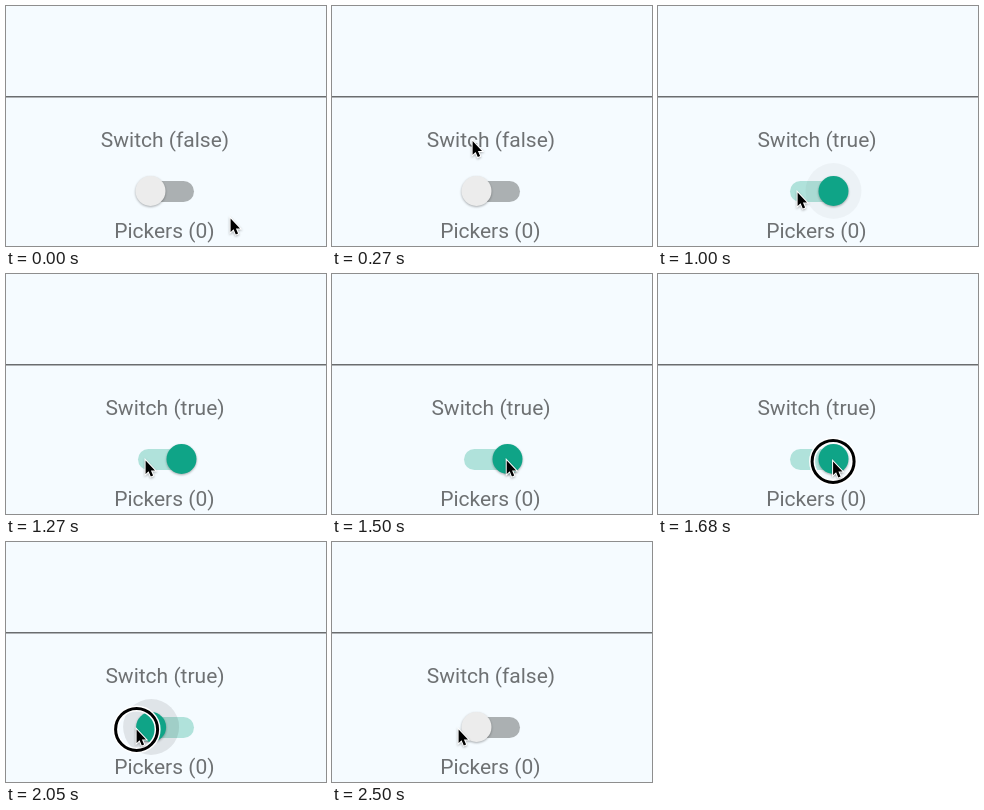
An HTML page for the animation above (2810 ms loop, 320x240 px).

```html
<!DOCTYPE html>
<html lang="en">
<head>
<meta charset="utf-8">
<title>Switch</title>
<style>
  html, body { margin: 0; width: 100%; height: 100%; overflow: hidden; background: #f5fbff; }
  svg { display: block; width: 320px; height: 240px; }
  text { font: 21px Roboto, sans-serif; fill: #6e7173; text-anchor: middle; }
  #thumb { filter: drop-shadow(0 1px 1.3px rgba(0, 0, 0, .32)); }
  #arrow { filter: drop-shadow(0 1px .8px rgba(0, 0, 0, .3)); }
</style>
</head>
<body>
<svg viewBox="0 0 320 240">
  <rect y="90" width="320" height="1.5" fill="#6a6d6f"/>
  <text id="label" x="159" y="141">Switch (false)</text>
  <text x="158.4" y="232">Pickers (0)</text>
  <rect id="track" x="132" y="175" width="56" height="21" rx="10.5"/>
  <circle id="ripple" cy="185"/>
  <circle id="thumb" cy="185" r="15"/>
  <g id="pointer">
    <g id="ring" fill="none">
      <circle r="21" stroke="#fff" stroke-width="6"/>
      <circle r="21" stroke="#000" stroke-width="3"/>
    </g>
    <path id="arrow" d="M0 0V13.6L3 10.8L5.2 16L7.5 15L5.3 10H9.4Z"
          stroke="#fff" stroke-width="2" paint-order="stroke"/>
  </g>
</svg>
<script>
const LOOP = 2810, TICK = 45.2;
const PRESS = 680, RELEASE = 820, DRAG = 1620, DROP = 2080;
const LEFT = 144.5, RIGHT = 175.5;

const [label, track, ripple, thumb, pointer, ring] =
  ['label', 'track', 'ripple', 'thumb', 'pointer', 'ring']
    .map(id => document.getElementById(id));

const clamp = (v, low, high) => Math.min(high, Math.max(low, v));
const within = (t, from, to) => t >= from && t < to;
const mix = (a, b, p) => a.map((v, i) => v + (b[i] - v) * p);
const rgb = c => `rgb(${c.map(Math.round)})`;

function ease(t, from, to) {
  const p = clamp((t - from) / (to - from), 0, 1);
  return p * p * (3 - 2 * p);
}

function bezier(a, b, c, d, u) {
  const v = 1 - u;
  return v * v * v * a + 3 * v * v * u * b + 3 * v * u * u * c + u * u * u * d;
}

function snap(t) {
  if (t < PRESS) return Math.min(550, Math.floor(t / 50) * 50);
  if (t < RELEASE) return PRESS;
  return RELEASE + TICK * Math.min(37, Math.floor((t - RELEASE + 5) / TICK));
}

function cursorAt(t) {
  const u = clamp(t / 550, 0, 1);
  const slide = 38 * ease(t, 1340, 1530) - 47 * ease(t, DRAG, 2040) - 4 * ease(t, 2130, 2310);
  return [
    bezier(224, 165, 70, 139, u) + slide + .6,
    bezier(212, 100, 125, 186, u) + ease(t, 1500, 1590) + .4
  ];
}

function thumbAt(t, cursorX) {
  if (t < DRAG) return LEFT + (RIGHT - LEFT) * ease(t, RELEASE, 1000);
  return clamp(cursorX + 14.5, LEFT, RIGHT);
}

function rippleAt(t) {
  const first = t < DRAG;
  const grow = first ? ease(t, 800, 930) : ease(t, 1810, 1990);
  const fade = first ? ease(t, RELEASE, 1300) : ease(t, DROP, 2500);
  return { radius: 14 + 14 * grow, shade: (first ? .05 : .09) * grow * (1 - fade) };
}

function draw() {
  const t = snap(performance.now() % LOOP);
  const [x, y] = cursorAt(t);
  const thumbX = thumbAt(t, x);
  const { radius, shade } = rippleAt(t);
  const on = ease(t, RELEASE, 950) - ease(t, DROP, 2220);

  label.textContent = `Switch (${within(t, RELEASE + 40, DROP + 45)})`;
  track.setAttribute('fill', rgb(mix([171, 176, 178], [176, 226, 219], on)));
  thumb.setAttribute('fill', rgb(mix([236, 236, 236], [15, 164, 135], on)));
  thumb.setAttribute('cx', thumbX);
  ripple.setAttribute('cx', thumbX);
  ripple.setAttribute('r', radius);
  ripple.setAttribute('fill-opacity', shade);
  pointer.setAttribute('transform', `translate(${x} ${y})`);
  ring.setAttribute('visibility',
    within(t, PRESS, RELEASE) || within(t, DRAG - 40, DROP) ? 'visible' : 'hidden');
  requestAnimationFrame(draw);
}
draw();
</script>
</body>
</html>
```
